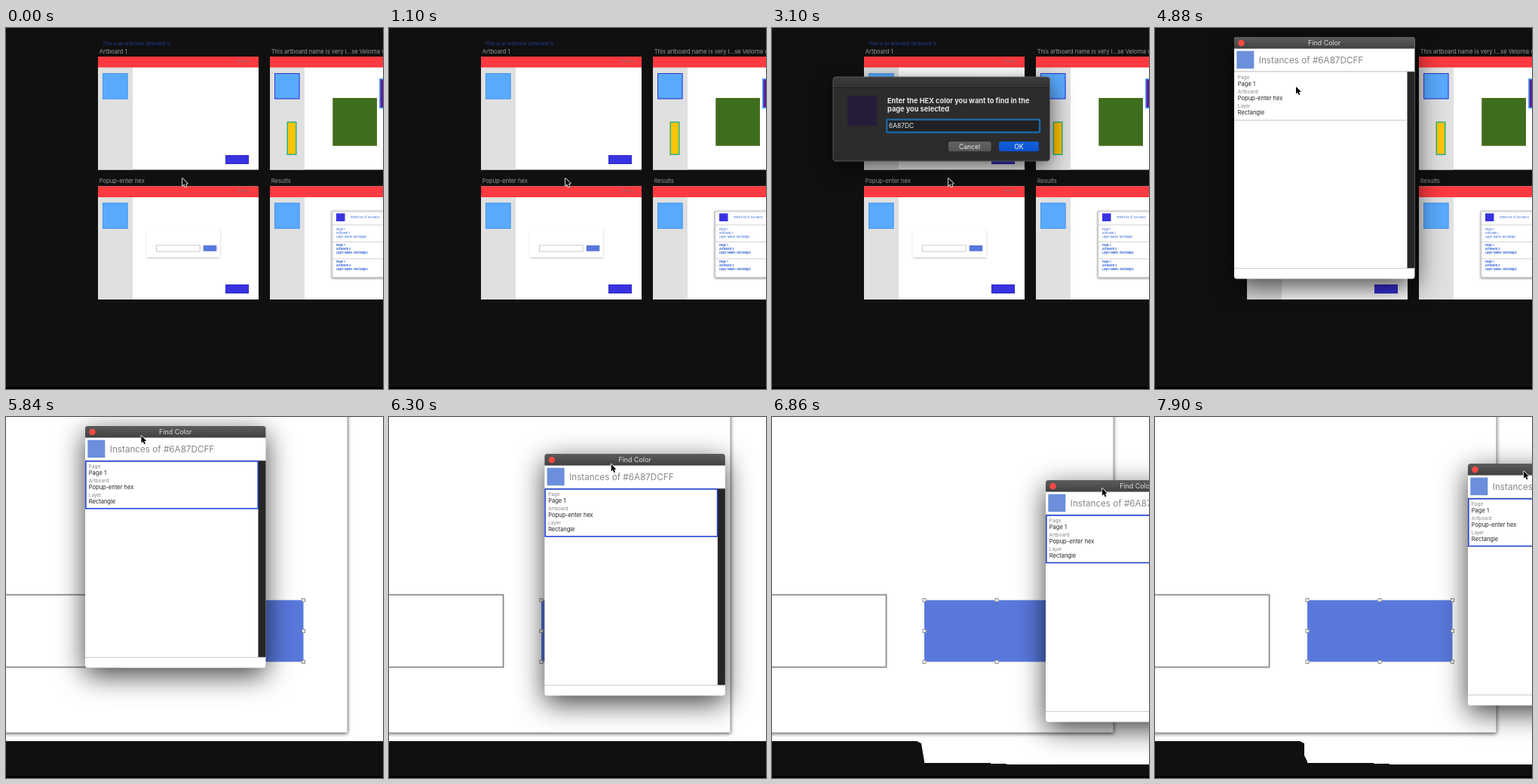
Animation, 500 px wide and 480 px high, one loop 8 s. Source, as an HTML page with a canvas:

```html
<!DOCTYPE html>
<html lang="en">
<head>
<meta charset="utf-8">
<title>Find Color</title>
<style>
  html, body { margin: 0; width: 100%; height: 100%; overflow: hidden; background: #101010; }
  canvas { display: block; }
</style>
</head>
<body>
<canvas id="stage" width="500" height="480"></canvas>
<script>
const ctx = document.getElementById('stage').getContext('2d');
const LOOP = 8000;
const BLUE = '#5878dc';

// Key poses: [time, x, y]
const windowPath = [[6000, 105, 12], [6300, 206, 49], [6760, 360, 82],
                    [6860, 363, 84], [6920, 364, 85], [7200, 364, 85], [7900, 415, 62]];
const cursorPath = [[4360, 234, 200], [4880, 187, 78], [5480, 187, 78], [5900, 179, 22]];

const clamp = v => Math.max(0, Math.min(1, v));
const ease = (t, from, to) => {
  const u = clamp((t - from) / (to - from));
  return u * u * (3 - 2 * u);
};

// Monotone cubic interpolation, so the poses never overshoot.
function along(path, t) {
  const last = path.length - 1;
  if (t <= path[0][0]) return path[0].slice(1);
  if (t >= path[last][0]) return path[last].slice(1);
  let i = 0;
  while (path[i + 1][0] <= t) i++;
  const span = path[i + 1][0] - path[i][0], u = (t - path[i][0]) / span;
  return [1, 2].map(k => {
    const slope = n => (path[n + 1][k] - path[n][k]) / (path[n + 1][0] - path[n][0]);
    const tangent = n => {
      if (n === 0 || n === last) return 0;
      const a = slope(n - 1), b = slope(n);
      return a * b <= 0 ? 0 : 2 * a * b / (a + b);
    };
    const a = path[i][k], b = path[i + 1][k];
    return a + (b - a) * u * u * (3 - 2 * u)
      + span * u * (1 - u) * (tangent(i) * (1 - u) - tangent(i + 1) * u);
  });
}

function rect(x, y, w, h, fill, stroke, line = 1) {
  if (fill) { ctx.fillStyle = fill; ctx.fillRect(x, y, w, h); }
  if (stroke) {
    ctx.strokeStyle = stroke;
    ctx.lineWidth = line;
    ctx.strokeRect(x + line / 2, y + line / 2, w - line, h - line);
  }
}

function rounded(x, y, w, h, r, fill, stroke, line = 1) {
  ctx.beginPath();
  ctx.roundRect(x, y, w, h, r);
  if (fill) { ctx.fillStyle = fill; ctx.fill(); }
  if (stroke) { ctx.strokeStyle = stroke; ctx.lineWidth = line; ctx.stroke(); }
}

function shape(points, fill, stroke) {
  ctx.beginPath();
  points.forEach(([x, y]) => ctx.lineTo(x, y));
  ctx.closePath();
  if (stroke) { ctx.strokeStyle = stroke; ctx.lineWidth = 1.6; ctx.lineJoin = 'round'; ctx.stroke(); }
  ctx.fillStyle = fill;
  ctx.fill();
}

function text(str, x, y, size, color, weight = 400, align = 'left') {
  ctx.font = `${weight} ${size}px Inter, sans-serif`;
  ctx.textAlign = align;
  ctx.fillStyle = color;
  ctx.fillText(str, x, y);
}

function shadowed(color, blur, dy, draw) {
  ctx.save();
  ctx.shadowColor = color;
  ctx.shadowBlur = blur;
  ctx.shadowOffsetY = dy;
  draw();
  ctx.restore();
}

function vertical(y0, y1, top, bottom) {
  const g = ctx.createLinearGradient(0, y0, 0, y1);
  g.addColorStop(0, top);
  g.addColorStop(1, bottom);
  return g;
}

// Fades and grows a panel around its centre.
function popIn(amount, cx, cy, draw) {
  if (amount <= 0) return;
  const s = 0.9 + 0.1 * amount;
  ctx.save();
  ctx.globalAlpha = amount;
  ctx.translate(cx, cy);
  ctx.scale(s, s);
  ctx.translate(-cx, -cy);
  draw();
  ctx.restore();
}

function artboard(x, y, name, squareBorder = '#4596ec') {
  text(name, x + 1.7, y - 4.3, 7.6, '#999');
  rect(x, y, 213, 150.5, '#fff');
  rect(x, y + 14, 46, 136.5, '#e0e0e0');
  rect(x, y, 213, 14.5, '#ff3a40');
  text('Element', x + 194, y + 7.5, 4.3, '#8b6468', 500, 'center');
  rect(x + 6, y + 22, 33.5, 34.5, '#59aaff', squareBorder);
}

const actionButton = (x, y) => rect(x, y, 31, 12, '#3932e1', '#302bc4');

function overview() {
  text('This is an artboard (artboard 1)', 128, 22.7, 6.2, '#21409c');
  artboard(122, 38, 'Artboard 1');
  actionButton(291, 169);

  artboard(350, 38, 'This artboard name is very l...se Velorna w', '#2f35d6');
  rect(372.5, 124.5, 13, 44.5, '#ffc400', '#27b39c', 1.5);
  rect(433.5, 93, 58.5, 63.5, '#3e6e1d', '#5b6b22', 0.7);
  rect(495, 67, 12, 40, '#5a1fa0', '#54aef5', 1.5);

  artboard(122, 210.5, 'Popup-enter hex');
  shadowed('rgba(0,0,0,.35)', 3, 1, () => rect(186.5, 266.5, 97.5, 38.5, '#fff'));
  rect(199, 288.5, 58.5, 9, '#fff', '#bbb', 0.8);
  rect(261.7, 289, 17.6, 7.8, BLUE);
  actionButton(291, 341);

  artboard(350, 210.5, 'Results');
  shadowed('rgba(0,0,0,.35)', 3, 1, () => rect(432, 243, 98, 89, '#fff', '#bbb', 0.7));
  rect(438, 246.5, 11.5, 10.5, '#3932e1');
  text('Instances of #4A4BE0', 457, 253.3, 3.7, '#4170e0');
  [261.5, 284, 306.5].forEach(y => rect(432, y, 68, 0.8, '#c8c8c8'));
  [269, 290, 312].forEach((y, i) =>
    ['Page 1', `Artboard ${i + 1}`, 'Layer Name: Rectangle'].forEach((line, n) =>
      text(line, 438, y + n * 5.2, 3.7, '#2c5fd8', i ? 700 : 400)));
}

function closeUp(t) {
  rect(0, 0, 500, 431, '#fff');
  // Canvas uncovered by the shadow of the dragged window
  if (t > 6300) {
    const [, y] = along(windowPath, t);
    const bottom = t > 6860 ? 480 : y + 378;
    const bend = t < 7400 ? [199, 440] : [198, 450];
    ctx.save();
    ctx.beginPath();
    ctx.rect(0, 431, 500, Math.max(0, bottom - 431));
    ctx.clip();
    shape([[192, 431], [198, 434], bend, [202, 458], [202, 460], [290, 460],
           [290, 461], [311, 461], [311, 462], [500, 462], [500, 431]], '#fff');
    ctx.restore();
  }
  shadowed('rgba(0,0,0,.7)', 5, 1, () => rect(-20, -20, 472.5, 439.5, '#fff'));
  rect(-20, 235.5, 172.5, 98, '#fff', '#8b8b8b', 1.8);
  rect(202, 243.5, 192.5, 82, BLUE);
  for (const x of [202, 298, 394.5])
    for (const y of [243.5, 284.5, 325.5])
      if (x !== 298 || y !== 284.5) rect(x - 2.5, y - 2.5, 5, 5, '#fff', '#8a8a8a');
}

function prompt(t) {
  shadowed('rgba(0,0,0,.65)', 30, 9, () => rounded(81, 65, 287.5, 112, 4, '#2c2c2c'));
  rounded(81, 65, 287.5, 14.5, [4, 4, 0, 0], vertical(65, 79, '#3c3c3c', '#323232'));
  rect(81, 79, 287.5, 0.8, '#1a1a1a');
  rounded(81, 65, 287.5, 112, 4, null, '#666', 0.8);
  rect(100, 90, 39, 40, '#251c3a');
  text('Enter the HEX color you want to find in the', 153, 100.3, 9.2, '#e8e8e8', 700);
  text('page you selected', 153, 111.3, 9.2, '#e8e8e8', 700);

  rounded(152.3, 121.8, 202.7, 17, 1.5, '#1f2123', '#1f669f', 2.4);
  const typed = '6A87DC'.slice(0, Math.floor(clamp((t - 1900) / 550) * 6));
  text(typed, 155, 133.2, 8.4, '#eee');
  const caret = t > 1900 && (t < 2560 || Math.floor((t - 2560) / 500) % 2 === 0);
  if (caret) rect(155.5 + ctx.measureText(typed).width, 125, 0.8, 10, '#ddd');

  rounded(234, 151, 56.5, 13, 2.5, vertical(151, 164, '#636363', '#565656'));
  rounded(301, 151, 53, 13, 2.5, vertical(151, 164, '#1462dc', '#0b50cc'));
  text('Cancel', 262, 160.8, 8.6, '#eee', 400, 'center');
  text('OK', 327.3, 160.8, 8.6, '#fff', 400, 'center');
}

function results(x, y, selected) {
  ctx.save();
  ctx.translate(x, y);
  shadowed('rgba(0,0,0,.75)', 36, 10, () => rounded(0, 0, 239.5, 321.5, 3.5, '#fff'));
  rounded(0, 0, 239.5, 15.5, [3.5, 3.5, 0, 0], vertical(0, 15, '#5c5c5c', '#424242'));
  ctx.beginPath();
  ctx.arc(9.5, 8, 4.2, 0, 7);
  ctx.fillStyle = '#fb4a43';
  ctx.fill();
  text('Find Color', 119.7, 11.3, 8.9, '#dedede', 400, 'center');

  rect(3.3, 18.5, 23, 23.5, '#6b8fdb');
  text('Instances of #6A87DCFF', 32.8, 34.8, 11.7, '#878787');
  rect(229.5, 46, 10, 261.5, '#252525');
  rect(0, 45.5, 239.5, 0.8, '#aaa');
  rect(0, 307.3, 239.5, 0.8, '#bbb');
  ['Page', 'Page 1', 'Artboard', 'Popup-enter hex', 'Layer', 'Rectangle'].forEach((line, i) => {
    const value = i % 2;
    text(line, 4.8, 56 + Math.floor(i / 2) * 19.1 + value * 9.2,
         value ? 7.5 : 6.4, value ? '#222' : '#888');
  });
  if (selected) rect(0, 46, 230, 64.5, null, '#2546d2', 1.6);
  else rect(0, 110.3, 229.5, 0.8, '#bbb');
  ctx.restore();
}

function cursor(x, y) {
  ctx.save();
  ctx.translate(x, y);
  shape([[0, 0], [0, 9.6], [2.2, 7.6], [3.8, 11.3], [5.4, 10.6], [3.9, 7], [6.8, 6.8]], '#000', '#fff');
  ctx.restore();
}

function draw(t) {
  rect(0, 0, 500, 480, '#101010');
  const zoomed = t >= 5320;
  if (zoomed) closeUp(t); else overview();
  rect(0, 477, 500, 3, '#060203');

  popIn(ease(t, 1200, 1300) * (1 - ease(t, 3380, 3480)), 224, 121, () => prompt(t));
  const [wx, wy] = along(windowPath, t);
  popIn(ease(t, 3680, 3880), 225, 173, () => results(wx, wy, t >= 5240));

  // The pointer runs slightly ahead of the window it drags.
  const [lx, ly] = along(windowPath, t + 40);
  if (t < 5960) cursor(...along(cursorPath, t));
  else cursor(lx + 74, ly + 10);
}

function tick() {
  draw(performance.now() % LOOP);
  requestAnimationFrame(tick);
}
tick();
</script>
</body>
</html>
```
